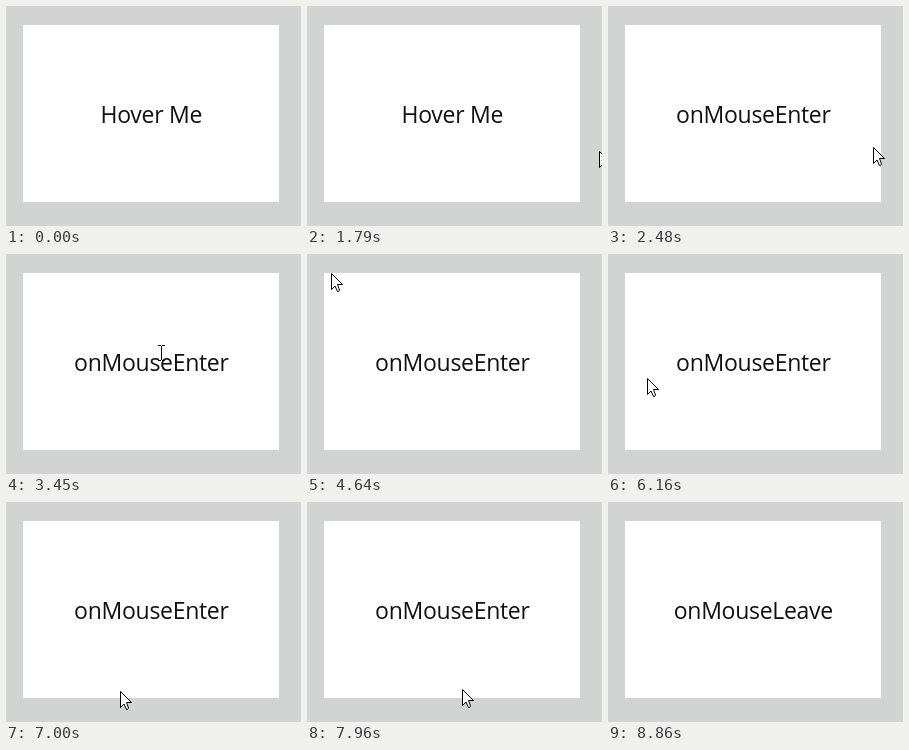
Write an HTML page with a canvas that moves like this. It is 295x220 px and loops after 9460 ms.

```html
<!DOCTYPE html>
<html lang="en">
<head>
<meta charset="utf-8">
<title>Mouse events</title>
<style>
  html, body { margin: 0; width: 100%; height: 100%; overflow: hidden; background: #d2d4d3; }
  canvas { display: block; }
</style>
</head>
<body>
<canvas id="stage" width="295" height="220"></canvas>
<script>
const ctx = document.getElementById('stage').getContext('2d');
const LOOP = 9460, SHOW = 1790, HIDE = 8860;
const BOX = { x: 17, y: 19, w: 256, h: 177 };
const START = [292, 145];

// Each stroke of the hand bends from the last resting place past `via` to `to`
const strokes = [
  { from: SHOW, until: 2210, via: [283, 144], to: [275, 144] },
  { from: 2340, until: 3450, via: [238, 134], to: [155, 99] },
  { from: 3450, until: 4920, via: [28, 22.4], to: [15, 13] },
  { from: 5250, until: 6160, via: [3, 65], to: [39, 124] },
  { from: 6250, until: 7180, via: [80, 170], to: [135, 201] },
  { from: 7340, until: 7760, via: [143, 196], to: [155, 187] },
  { from: 7960, until: HIDE, via: [180, 210], to: [226, 222] }
];

const bend = (a, b, c, u) => (1 - u) ** 2 * a + 2 * u * (1 - u) * b + u * u * c;

function pointerAt(t) {
  let pos = START;
  for (const { from, until, via, to } of strokes) {
    if (t < from) break;
    const u = Math.min(1, (t - from) / (until - from));
    pos = pos.map((v, i) => bend(v, via[i], to[i], u));
  }
  return { x: Math.round(pos[0]), y: Math.round(pos[1]) };
}

const inBox = p => p.x >= BOX.x && p.x < BOX.x + BOX.w && p.y >= BOX.y && p.y < BOX.y + BOX.h;
const overText = p => p.x > 68 && p.x < 222 && p.y > 91 && p.y < 125;

const arrow = new Path2D('M.5 .5V16.5L4 13L6.5 18.5H7.5L8.5 17L6.5 11.5H11.5Z');

function drawArrow({ x, y }) {
  ctx.save();
  ctx.translate(x, y);
  ctx.fillStyle = '#fff';
  ctx.fill(arrow);
  ctx.strokeStyle = '#000';
  ctx.stroke(arrow);
  ctx.restore();
}

function drawBeam({ x, y }) {
  ctx.fillStyle = '#000';
  ctx.fillRect(x, y - 7, 1, 14);
  for (const dy of [-8, 7]) {
    ctx.fillRect(x - 3, y + dy, 3, 1);
    ctx.fillRect(x + 1, y + dy, 3, 1);
  }
}

function draw(t) {
  const p = pointerAt(t);
  const entered = t > strokes[1].from;
  const label = inBox(p) ? 'onMouseEnter' : entered ? 'onMouseLeave' : 'Hover Me';

  ctx.fillStyle = '#d2d4d3';
  ctx.fillRect(0, 0, 295, 220);
  ctx.fillStyle = '#fff';
  ctx.fillRect(BOX.x, BOX.y, BOX.w, BOX.h);

  ctx.font = '23px "Open Sans", "Noto Sans", sans-serif';
  ctx.letterSpacing = '-0.3px';
  ctx.textAlign = 'center';
  ctx.fillStyle = '#111';
  ctx.fillText(entered && !inBox(p) && t < 2410 ? 'Hover Me' : label, 145.3, 117);

  if (t >= SHOW && t < HIDE) (overText(p) ? drawBeam : drawArrow)(p);
}

function tick() {
  draw(performance.now() % LOOP);
  requestAnimationFrame(tick);
}
tick();
</script>
</body>
</html>
```
